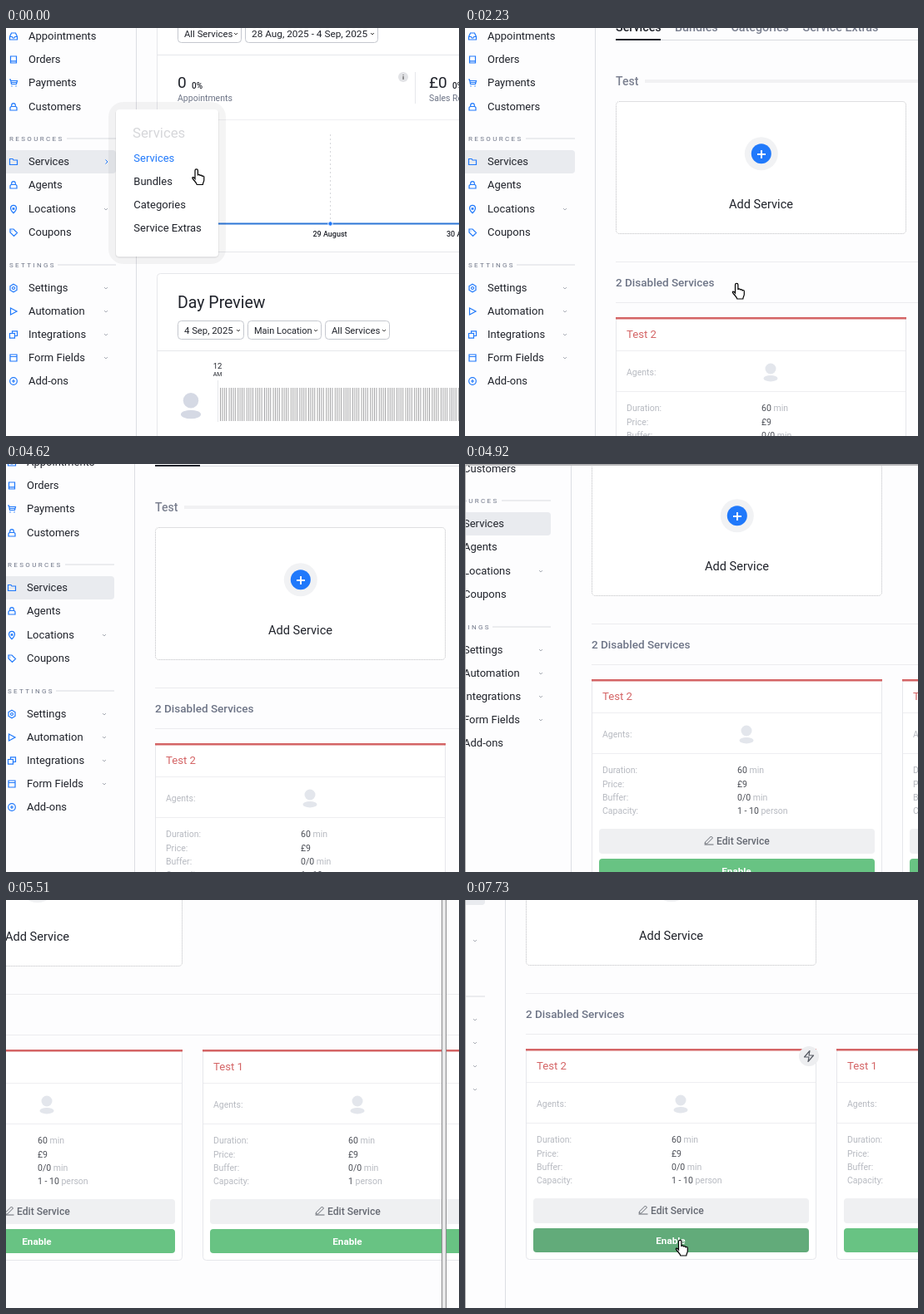
These frames come from a looping animation (544x491 px, 8 s). An HTML page:

```html
<!DOCTYPE html>
<html lang="en">
<head>
<meta charset="utf-8">
<title>Booking admin</title>
<style>
html, body { margin: 0; height: 100%; overflow: hidden; background: #fdfdfe; }
svg { display: block; width: 100vw; height: 100vh; font-family: Roboto, sans-serif; }
</style>
</head>
<body>
<svg id="stage" viewBox="0 0 544 491"></svg>
<script>
const BLUE = '#2079fb', INK = '#20232b', SLATE = '#6d7486', PALE = '#b7bac1', RULE = '#e6e7eb', RED = '#d46465';

const text = (x, y, s, size, fill = INK, more = '') =>
  `<text x="${x}" y="${y}" font-size="${size}" fill="${fill}" ${more}>${s}</text>`;
const rect = (x, y, w, h, fill, more = '') =>
  `<rect x="${x}" y="${y}" width="${w}" height="${h}" fill="${fill}" ${more}/>`;
const line = (x1, y1, x2, y2, stroke = RULE, more = '') =>
  `<path d="M${x1} ${y1}L${x2} ${y2}" stroke="${stroke}" ${more}/>`;
const path = (x, y, d, stroke, more = 'fill="none"') =>
  `<path transform="translate(${x} ${y})" d="${d}" stroke="${stroke}" ${more}/>`;
const disc = (x, y, r, fill, more = '') =>
  `<circle cx="${x}" cy="${y}" r="${r}" fill="${fill}" ${more}/>`;
const group = (id, body) => `<g id="${id}">${body}</g>`;
const MID = 'text-anchor="middle" ', MEDIUM = 'font-weight="500"';

const chevron = (x, y, color = '#a9adb6') => path(x, y, 'M-2-1L0 1L2-1', color);
const avatar = (x, y, k, fill) =>
  `<g transform="translate(${x} ${y}) scale(${k})" fill="${fill}"><circle cy="-4" r="6.5"/><ellipse cy="7.7" rx="8.5" ry="3.7"/></g>`;

// Sidebar
const person = 'M-4 4V1.5Q-4-.5-2-.5H2Q4-.5 4 1.5V4ZM-2.3-.5V-2a2.3 2.3 0 0 1 4.6 0V-.5';
const items = [
  ['Appointments', 10, 'M-4.5 4V.5L-2.5-4H2.5L4.5.5V4ZM-4.5.5H-1.7L-.8 2H.8L1.7.5H4.5'],
  ['Orders', 38, 'M-3.5-4H3.5V4H-3.5ZM-3.5 1.8H3.5'],
  ['Payments', 66, 'M-5-4H-3.5L-2.5 1.5H3.5L4.5-2.5H-3.2M-3-.5H4M-2 3.2V4.5M3 3.2V4.5'],
  ['Customers', 95, person],
  ['Services', 161, 'M-4.5-3.5H-1L0-2H4.5V3.5H-4.5Z'],
  ['Agents', 189, person],
  ['Locations', 218, 'M0 4.7C-6-1-3-4.7 0-4.7S6-1 0 4.7ZM-.8-1.2H.8V.2H-.8Z', 1],
  ['Coupons', 246, 'M-4-4H0L4.5.5L.5 4.5L-4 0ZM-2-2.2V-1.6'],
  ['Settings', 313, 'M0-4.7L4-2.4V2.4L0 4.7L-4 2.4V-2.4ZM-1.5 0a1.5 1.5 0 0 0 3 0a1.5 1.5 0 0 0-3 0', 1],
  ['Automation', 341, 'M-3.5-4L4 0L-3.5 4Z', 1],
  ['Integrations', 369, 'M-4.5-1.5H1.5V4.2H-4.5ZM-1.5-1.5V-4.2H4.5V1.5H1.5', 1],
  ['Form Fields', 397, 'M-4-4H4V4H-4ZM-4-1.5H4', 1],
  ['Add-ons', 425, 'M-4.3 0a4.3 4.3 0 0 0 8.6 0a4.3 4.3 0 0 0-8.6 0M-2 0H2M0-2V2']
];
const heading = (s, y, x) =>
  text(4, y + 3, s, 8, SLATE, 'letter-spacing="2.35"') + line(x, y, 132, y, '#d9dbe0');
const sidebar =
  line(156.5, -200, 156.5, 900, '#dcdee3') +
  rect(-10, 147, 142, 28, '#e9ebef', 'id="active" rx="4"') +
  items.map(([name, y, icon, more]) =>
    path(9, y, icon, BLUE, 'fill="none" stroke-width="1.2"') +
    text(27, y + 4.4, name, 13) + (more ? chevron(120, y) : '')).join('') +
  heading('RESOURCES', 133, 73) + heading('SETTINGS', 285, 62);

// Dashboard
const select = (x, y, w, s, size = 11.3) =>
  rect(x + .5, y + .5, w - 1, 22, '#fff', 'rx="4" stroke="#c5c8cf"') +
  text(x + 8, y + 15.5, s, size) + chevron(x + w - 7, y + 12, '#444');
const stat = (x, value, label) =>
  text(x, 72, value, 19) + text(x + (value.length > 1 ? 28 : 17), 72.5, '0%', 10, INK, MEDIUM) +
  text(x, 88, label, 10.5, SLATE);
const dashboard =
  rect(181.5, -20, 500, 289.5, '#fff', `stroke="${RULE}"`) +
  select(206, -5, 77, 'All Services') + select(287, -5, 160, '28 Aug, 2025 - 4 Sep, 2025', 11.8) +
  line(182, 32.5, 544, 32.5) +
  stat(206, '0', 'Appointments') + stat(508, '£0', 'Sales Revenue') +
  disc(477, 59, 6, '#e2e3e6') + text(477, 62, 'i', 8, '#555', MID + 'font-weight="700"') +
  line(491.5, 53, 491.5, 91) + line(182, 110.5, 544, 110.5, '#efeff2') +
  line(389.5, 128, 389.5, 233, '#d5d6da', 'stroke-dasharray="2 3"') +
  line(182, 235.5, 544, 235.5, '#2d76d6', 'stroke-width="2"') +
  disc(389.5, 235.5, 2.7, BLUE, 'stroke="#fff"') +
  text(389, 251, '29 August', 9, INK, MID + MEDIUM) + text(529, 251, '30 August', 9, INK, MEDIUM) +
  rect(181.5, 295.5, 500, 300, '#fff', `rx="4" stroke="${RULE}"`) +
  text(206, 336.5, 'Day Preview', 19.5) +
  select(206, 352, 80, '4 Sep, 2025') + select(290, 352, 89, 'Main Location', 11) + select(383, 352, 78, 'All Services') +
  line(182, 388.5, 544, 388.5) +
  text(254, 410, '12', 9.5, INK, MID) + text(254, 419, 'AM', 7, INK, MID) +
  line(254.5, 424, 254.5, 474) +
  avatar(222, 454, 1.42, '#d5d9e4') +
  line(257, 453, 544, 453, '#a5a5a7', 'stroke-width="40" stroke-dasharray="1 1.4 1 1.4 1 1.4 1 2.4"');
const popup =
  rect(123, 89, 141, 195, '#000', 'rx="18" opacity=".045"') +
  rect(131, 98, 125, 179, '#000', 'rx="5" opacity=".06"') +
  rect(132, 98, 123, 177, '#fff', 'rx="4"') +
  text(152, 132, 'Services', 16.8, '#d6d7da') +
  ['Services', 'Bundles', 'Categories', 'Service Extras'].map((s, i) =>
    text(153.3, 161 + 28 * i, s, 13, i ? INK : BLUE)).join('') +
  path(120.5, 161, 'M-1-2.5L1.5 0L-1 2.5', BLUE);

// Services page
const card = (x, name, capacity) => {
  const rows = [['Duration', '60', 'min'], ['Price', '£9', ''], ['Buffer', '0/0', 'min'], ['Capacity', capacity, 'person']];
  return `<g transform="translate(${x} 348)">` +
    rect(.5, .5, 348, 253, '#fff', `rx="4" stroke="${RULE}"`) + rect(0, 0, 349, 2.5, RED) +
    text(13, 25, name, 13.2, RED) + line(1, 40.5, 348, 40.5, '#eeeef1') +
    text(13, 69.5, 'Agents:', 10.5, PALE) + avatar(186, 66, 1, '#e3e6ec') + line(1, 89.5, 348, 89.5, '#eeeef1') +
    rows.map(([label, value, unit], i) => {
      const y = 113.3 + 16.3 * i;
      return text(13, y, label + ':', 10.5, PALE) +
        text(175, y, `${value} <tspan fill="${PALE}">${unit}</tspan>`, 10.5, '#4b4e56');
    }).join('') +
    rect(9, 180, 331, 30, '#eff0f2', 'rx="4"') +
    path(140.5, 194, 'M-5 5H6M-4 2L3-5L5-3L-2 4L-4.5 4Z', '#666a73') +
    text(150, 199.3, 'Edit Service', 12.1, '#666a73', MEDIUM) +
    rect(9, 216, 331, 29, '#68c383', 'class="enable" rx="4"') +
    text(174, 235, 'Enable', 11.7, '#fff', MID + 'font-weight="600"') + '</g>';
};
const tabs = [['Services', 181], ['Bundles', 252], ['Categories', 319.5], ['Service Extras', 405.5]];
const services =
  tabs.map(([s, x], i) => text(x, 4.3, s, 14.3, i ? '#7b8090' : INK, MEDIUM)).join('') +
  line(181, 14.5, 900, 14.5, '#d9dbe0') + rect(181, 13, 54, 2, INK) +
  text(181, 69, 'Test', 14, '#7b8090', MEDIUM) + rect(216, 62, 700, 4, '#f1f1f3') +
  rect(181.5, 88.5, 348, 159, '#fff', 'id="box" rx="4" stroke-dasharray="1 1"') +
  disc(355.8, 151.3, 20, '#f1f2f4', 'id="halo"') + disc(355.8, 151.3, 12, BLUE, 'id="plus"') +
  path(356, 152, 'M-5 0H5M0-5V5', '#fff', 'stroke-width="2"') +
  text(355.5, 217, 'Add Service', 14.6, INK, 'id="add" ' + MID) +
  line(181, 281.5, 900, 281.5, '#ececef') + text(181, 311, '2 Disabled Services', 13.5, SLATE, MEDIUM) +
  line(181, 330.5, 900, 330.5, '#ececef') +
  group('cards', card(181, 'Test 2', '1 - 10') + card(554, 'Test 1', '1') +
    group('badge', disc(521, 357, 12, '#edeef0') +
      path(521, 357, 'M1-6.5L-5.5 1H0L-1 6.5L5.5-1H0Z', '#555962', 'fill="none" stroke-width="1.2" stroke-linejoin="round"')));

const arrow = path(0, 0, 'M0 0V14L3.3 11L5.4 16L7.6 15L5.4 10.2H9.8Z', '#fff', 'id="arrow" fill="#000" stroke-width="1.4" paint-order="stroke"');
const hand = path(0, 0, 'M4.5 12V2a1.7 1.7 0 0 1 3.4 0v6c0-1.6 2.6-1.6 2.6 0v.6c0-1.5 2.5-1.4 2.5.2v.7c0-1.4 2.3-1.3 2.3.3v3.7c0 2-1.3 3-1.5 5.5H6.8C6.6 17 3.5 14.5 1.6 11.6c-1-1.6 1-2.6 2.9.4z',
  '#000', 'id="hand" fill="#fff" stroke-width="1.2"');

const $ = id => document.getElementById(id);
$('stage').innerHTML = rect(0, 0, 544, 491, '#fdfdfe') +
  group('camera', group('dashboard', dashboard) + group('services', services) + sidebar + group('popup', popup)) +
  rect(0, 0, 544, 2, '#b4b4b6', 'id="topEdge"') + rect(0, 0, 1, 491, '#b4b4b6', 'id="leftEdge"') +
  rect(523.5, -2, 5, 500, '#e8e8e9', 'id="bar" stroke="#8c8c8e"') +
  group('cursor', arrow + hand);
const firstEnable = document.querySelector('.enable');

// Tracks: [step, values...], linear between keys
const STEP = 148.4, LOOP = 8000;
const cursorTrack = [
  [0, 222.5, 169.5], [1, 407, 274], [8, 407, 274], [13, 321, 306], [14, 321, 306], [15, 320, 307], [21, 320, 307],
  [22, 338, 250], [23, 345, 205], [24, 323, 287], [28, 560, 300], [38, 560, 300], [39, 303, 216], [42, 303, 216],
  [45, 285, 436], [46, 279, 472], [48, 267, 442], [49, 267, 442], [50, 254, 415], [52, 252, 409]
];
const cameraTrack = [
  [30, 0, 0], [31, -2, -12], [33, -29, -89], [35, -120, -168], [37, -318, -168], [38, -200, -169], [39, -108, -169]
];
const swapTrack = [[3, 0], [7, 1]];
const addTrack = [[21, 0], [22, .4], [23, 1], [24, 1], [27, 0]];
const enableTrack = [[49, 0], [50, .4], [52, 1]];

function sample(track, n) {
  const i = track.findIndex(key => key[0] > n);
  if (i === 0) return track[0].slice(1);
  if (i < 0) return track[track.length - 1].slice(1);
  const a = track[i - 1], b = track[i], k = (n - a[0]) / (b[0] - a[0]);
  return a.slice(1).map((v, j) => v + (b[j + 1] - v) * k);
}
const set = (id, attr, value) => $(id).setAttribute(attr, value);
const show = (id, on) => set(id, 'visibility', on ? 'visible' : 'hidden');
const mix = (a, b, k) => `rgb(${a.map((v, i) => Math.round(v + (b[i] - v) * k))})`;

function draw(now) {
  const n = Math.floor(now % LOOP / STEP);
  const [swap] = sample(swapTrack, n), [add] = sample(addTrack, n), [press] = sample(enableTrack, n);
  set('camera', 'transform', `translate(${sample(cameraTrack, n)})`);
  set('cursor', 'transform', `translate(${sample(cursorTrack, n)})`);
  set('dashboard', 'opacity', 1 - swap);
  set('services', 'opacity', swap);
  show('popup', n < 1);
  show('active', n < 1 || n >= 4);
  show('cards', n >= 13);

  set('box', 'stroke', mix([190, 191, 195], [32, 121, 240], add));
  set('halo', 'r', 20 + 15.5 * add);
  set('plus', 'r', 12 + 2.7 * add);
  set('add', 'y', 217 + 3 * add);
  set('badge', 'opacity', press);
  firstEnable.setAttribute('fill', mix([104, 195, 131], [98, 171, 122], press));

  show('topEdge', n >= 32 && n <= 34);
  show('leftEdge', n >= 32 && n <= 34 || n >= 39);
  show('bar', n === 36 || n === 37);
  const pointing = n < 1 || n >= 12 && n < 29 || n >= 50;
  show('hand', pointing);
  show('arrow', !pointing);
  requestAnimationFrame(draw);
}
draw(0);
</script>
</body>
</html>
```
